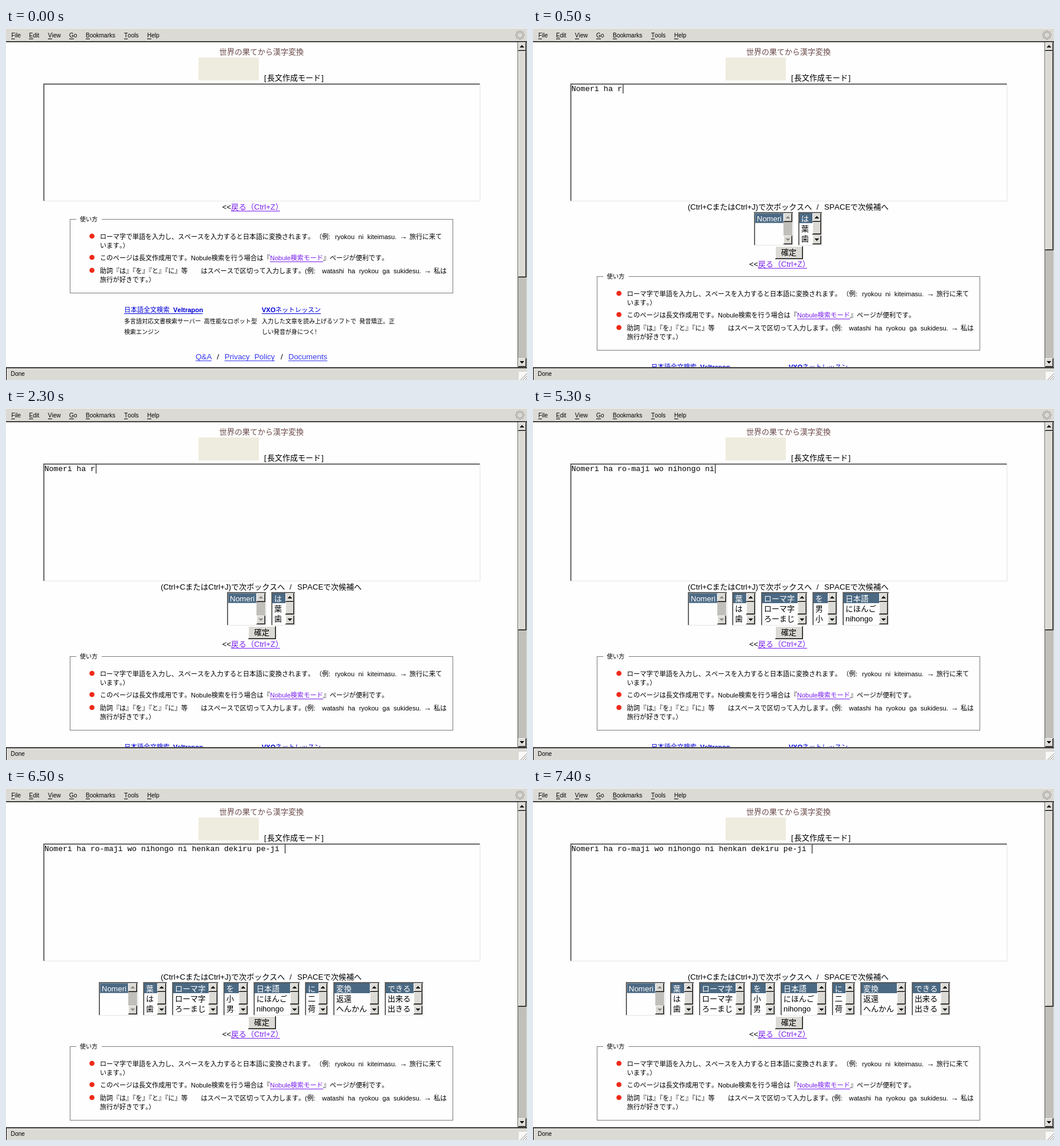
Write an HTML page with a canvas that moves like this. It is 882 px wide and 597 px high and loops after 8 s.

```html
<!DOCTYPE html>
<html lang="ja">
<head>
<meta charset="utf-8">
<title>Kana input</title>
<style>
  html, body { margin: 0; width: 100%; height: 100%; overflow: hidden; background: #fff; }
  canvas { display: block; }
</style>
</head>
<body>
<canvas id="stage" width="882" height="597"></canvas>
<script>
const ctx = document.getElementById('stage').getContext('2d');
const SANS = '"Liberation Sans", "Noto Sans CJK JP", "Noto Sans CJK", sans-serif';
const MONO = '"Liberation Mono", monospace';
const FACE = '#dcdad5', TROUGH = '#c1bfba', SHADE = '#85837f', SELECTED = '#4b6983';
const BLUE = '#0000d8', PALE_BLUE = '#3838f0', VISITED = '#7a1ff0';
const LOOP = 8000;
const PAGE_CENTER = 432;

const BRAND = 'Nomeri';
const ROMAJI = [48, BRAND];
const HA = [22, '葉', 'は', '歯'];
const ROMA = [60, 'ローマ字', 'ローマ字', 'ろーまじ'];
const NIHONGO = [60, '日本語', 'にほんご', 'nihongo'];

// Each list is its row width followed by the candidates.
const states = [
  { at: 0, shift: 0, thumbEnd: 423 },
  { at: 500, shift: 97, thumbEnd: 377, typed: BRAND + ' ha r',
    lists: [ROMAJI, [22, 'は', '葉', '歯']] },
  { at: 3500, shift: 97, thumbEnd: 377, typed: BRAND + ' ha ro-maji wo nihongo ni',
    lists: [ROMAJI, HA, ROMA, [24, 'を', '男', '小'], NIHONGO] },
  { at: 6500, shift: 114, thumbEnd: 371,
    typed: BRAND + ' ha ro-maji wo nihongo ni henkan dekiru pe-ji ',
    lists: [ROMAJI, HA, ROMA, [24, 'を', '小', '男'], NIHONGO, [21, 'に', '二', '荷'],
            [60, '変換', '返還', 'へんかん'], [47, 'できる', '出来る', '出きる']] }
];

function rect(x, y, w, h, color) {
  ctx.fillStyle = color;
  ctx.fillRect(x, y, w, h);
}

function text(str, x, y, size = 13, color = '#000', weight = '') {
  ctx.font = `${weight} ${size}px ${SANS}`;
  ctx.fontKerning = 'none'; // keeps adjacent Japanese brackets full width
  ctx.wordSpacing = size * 0.32 + 'px';
  ctx.fillStyle = color;
  ctx.fillText(str, x, y);
  return ctx.measureText(str).width;
}

function link(str, x, y, size, color, weight) {
  const w = text(str, x, y, size, color, weight);
  rect(x, y + 2, Math.round(w), 1, color);
}

function disc(x, y, r, color) {
  ctx.fillStyle = color;
  ctx.beginPath();
  ctx.arc(x, y, r, 0, Math.PI * 2);
  ctx.fill();
}

function raised(x, y, w, h) {
  rect(x, y, w, h, '#000');
  rect(x, y, w - 1, h - 1, '#fff');
  rect(x + 1, y + 1, w - 2, h - 2, SHADE);
  rect(x + 1, y + 1, w - 3, h - 3, FACE);
}

function sunken(x, y, w, h) {
  rect(x, y, w, h, '#e4e4e4');
  rect(x, y, w - 1, h - 1, SHADE);
  rect(x + 1, y + 1, w - 2, h - 2, '#505050');
  rect(x + 2, y + 2, w - 3, h - 3, '#fefefe');
}

function arrowButton(x, y, w, up, enabled) {
  raised(x, y, w, 15);
  const color = enabled ? '#000' : '#8a8884';
  const middle = x + Math.floor((w - 1) / 2);
  for (let i = 0; i < 4; i++) {
    rect(middle - i, y + (up ? 5 + i : 8 - i), 1 + 2 * i, 1, color);
  }
}

function scrollbar(x, y, w, h, thumbEnd) {
  rect(x, y, w, h, TROUGH);
  const enabled = thumbEnd !== undefined;
  if (enabled) raised(x, y + 15, w, thumbEnd - y - 15);
  arrowButton(x, y, w, true, enabled);
  arrowButton(x, y + h - 15, w, false, enabled);
}

function listBox(x, y, [w, ...items]) {
  sunken(x, y, w + 19, 57);
  rect(x + 2, y + 2, w, 17, SELECTED);
  items.forEach((item, i) => text(item, x + 5, y + 16 + i * 17, 13, i ? '#000' : '#fff'));
  const single = items.length === 1;
  if (single) {
    ctx.strokeStyle = '#b4c6d6';
    ctx.lineWidth = 1;
    ctx.setLineDash([1, 1]);
    ctx.strokeRect(x + 2.5, y + 2.5, w - 1, 16);
    ctx.setLineDash([]);
  }
  scrollbar(x + w + 2, y + 2, 15, 53, single ? undefined : y + 38);
}

function candidates(lists, top) {
  text('(Ctrl+CまたはCtrl+J)で次ボックスへ', 262, top + 5);
  text('/', 480, top + 5);
  text('SPACEで次候補へ', 493, top + 5);
  const total = lists.reduce((sum, [w]) => sum + w + 27, -8);
  let x = Math.round(PAGE_CENTER - total / 2);
  for (const list of lists) {
    listBox(x, top + 9, list);
    x += list[0] + 27;
  }
  raised(410, top + 67, 47, 22);
  text('確定', 420, top + 82);
}

function header() {
  text('世界の果てから漢字変換', 361, 45, 13, '#6c4a4a');
  rect(326, 50, 102, 39, '#eeecde');
  text('[', 437, 89);
  text('長文作成モード', 442, 89);
  text(']', 534, 89);
}

function editor(typed) {
  sunken(63, 94, 740, 200);
  if (!typed) return;
  ctx.font = `13px ${MONO}`;
  ctx.wordSpacing = '0px';
  ctx.fillStyle = '#000';
  ctx.fillText(typed, 65, 107);
  rect(Math.round(66 + ctx.measureText(typed).width), 96, 1, 15, '#000');
}

function help() {
  text('<<', 366, 308);
  text('戻る（Ctrl+Z', 381, 308, 13, VISITED);
  text('）', 456, 308, 13, VISITED);
  rect(381, 310, 83, 1, VISITED);

  ctx.strokeStyle = '#7c7c7c';
  ctx.lineWidth = 1;
  ctx.strokeRect(108.5, 324.5, 648, 125);
  rect(119, 323, 43, 3, '#fefefe');
  text('使い方', 125, 328, 10);

  for (const y of [353, 389, 411]) disc(145.5, y, 4.3, '#ee2a18');

  text('ローマ字で単語を入力し、スペースを入力すると日本語に変換されます。', 159, 358, 11);
  text('（例:', 524, 358, 11);
  text('ryokou ni kiteimasu.', 557, 358, 11);
  text('→', 666, 358, 13);
  text('旅行に来て', 683, 358, 11);
  text('います。）', 159, 373, 11);

  text('このページは長文作成用です。Nobule検索を行う場合は『', 159, 394, 11);
  link('Nobule検索モード', 447, 394, 11, VISITED);
  text('』ページが便利です。', 537, 394, 11);

  text('助詞『は』『を』『と』『に』等', 159, 416, 11);
  text('はスペースで区切って入力します。', 330, 416, 11);
  text('(例:', 506, 416, 11);
  text('watashi ha ryokou ga sukidesu.', 535, 416, 11);
  text('→', 707, 416, 13);
  text('私は', 724, 416, 11);
  text('旅行が好きです。）', 159, 431, 11);
}

function footer() {
  text('日本語全文検索', 200, 482, 11, BLUE);
  text('Veltrapon', 283, 482, 11, BLUE, 'bold');
  rect(200, 484, 133, 1, BLUE);
  text('多言語対応文書検索サーバー', 200, 501, 10);
  text('高性能なロボット型', 335, 501, 10);
  text('検索エンジン', 200, 519, 10);

  text('VXO', 433, 482, 11, BLUE, 'bold');
  text('ネットレッスン', 456, 482, 11, BLUE);
  rect(433, 484, 100, 1, BLUE);
  text('入力した文章を読み上げるソフトで', 433, 501, 10);
  text('発音矯正。正', 598, 501, 10);
  text('しい発音が身につく!', 433, 519, 10);

  link('Q&A', 321, 562, 13, PALE_BLUE);
  text('/', 357, 562);
  link('Privacy Policy', 370, 562, 13, PALE_BLUE);
  text('/', 465, 562);
  link('Documents', 478, 562, 13, PALE_BLUE);
}

function windowFrame(thumbEnd) {
  rect(0, 0, 882, 24, FACE);
  rect(0, 0, 882, 1, '#f4f3f0');
  rect(0, 22, 882, 1, SHADE);
  rect(0, 23, 882, 1, '#000');
  const menus = { File: 9, Edit: 39, View: 71, Go: 107, Bookmarks: 135, Tools: 200, Help: 239 };
  for (const [name, x] of Object.entries(menus)) {
    text(name, x, 16, 10);
    rect(x, 18, Math.round(ctx.measureText(name[0]).width), 1, '#000');
  }
  for (let i = 0; i < 8; i++) {
    const a = i * Math.PI / 4;
    disc(870 + 6 * Math.cos(a), 12 + 6 * Math.sin(a), 2.2, '#aaa8a4');
    disc(870 + 6 * Math.cos(a), 12 + 6 * Math.sin(a), 1.3, '#cfcdc9');
  }

  rect(866, 24, 1, 551, '#55534f');
  scrollbar(867, 24, 14, 551, thumbEnd);
  rect(881, 24, 1, 551, FACE);

  rect(0, 575, 882, 22, FACE);
  rect(0, 575, 882, 1, SHADE);
  rect(0, 576, 882, 1, '#000');
  rect(0, 576, 1, 21, '#000');
  text('Done', 8, 590, 10);

  rect(868, 583, 14, 14, '#f8f8f6');
  ctx.strokeStyle = '#8a8884';
  ctx.lineWidth = 1;
  ctx.beginPath();
  for (let i = 3; i < 14; i += 4) {
    ctx.moveTo(882 - i, 597);
    ctx.lineTo(882, 597 - i);
  }
  ctx.stroke();
}

function draw(time) {
  const now = time % LOOP;
  const state = states.findLast(s => s.at <= now);
  rect(0, 0, 882, 597, '#fefefe');

  ctx.save();
  ctx.beginPath();
  ctx.rect(0, 24, 866, 551);
  ctx.clip();
  header();
  editor(state.typed);
  if (state.lists) candidates(state.lists, 206 + state.shift);
  ctx.translate(0, state.shift);
  help();
  footer();
  ctx.restore();

  windowFrame(state.thumbEnd);
}

const start = performance.now();
function tick() {
  draw(performance.now() - start);
  requestAnimationFrame(tick);
}
tick();
</script>
</body>
</html>
```
